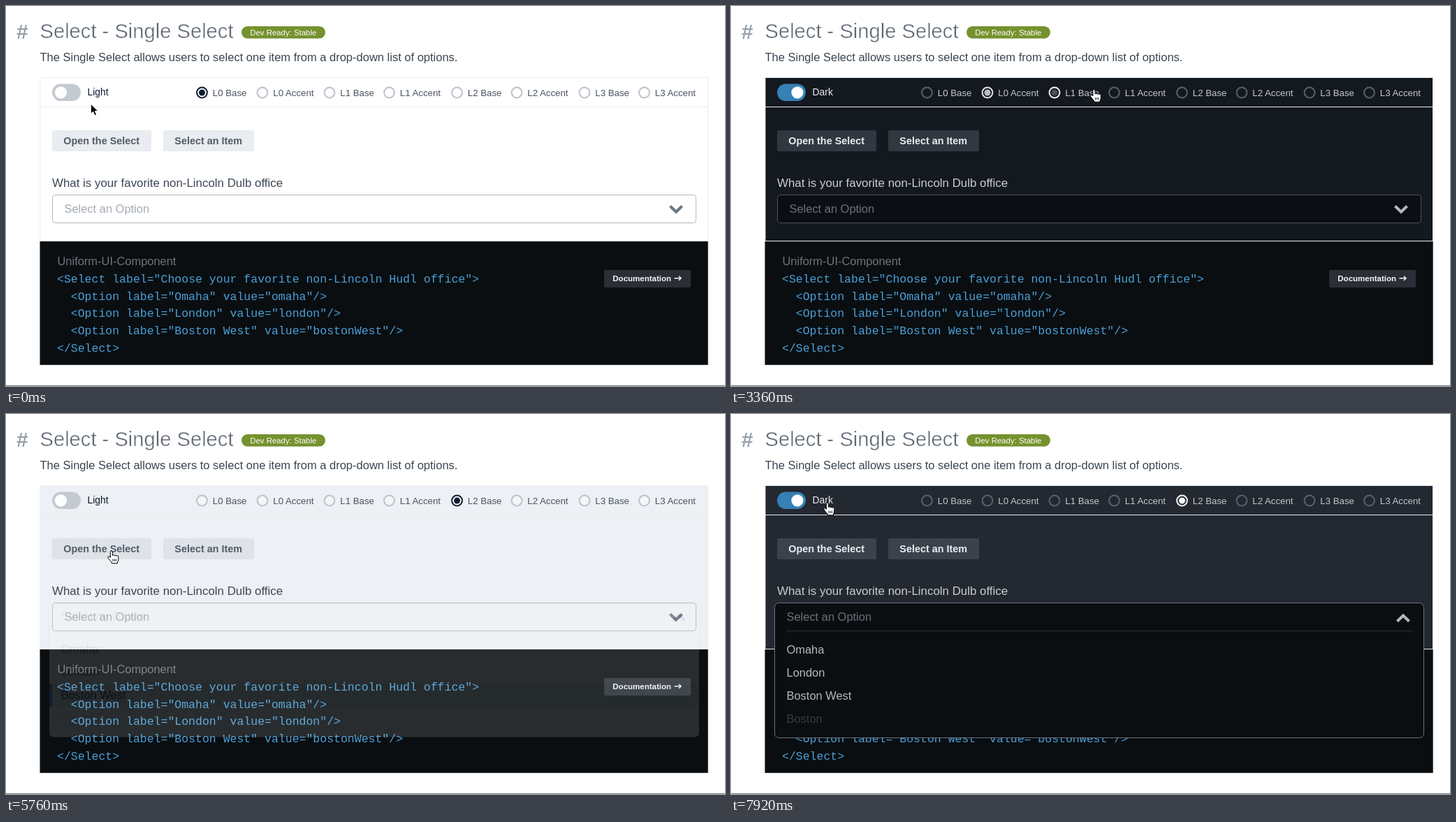
Animation, 1029 px wide and 544 px high, one loop 8 s. Source, as an HTML page:

```html
<!DOCTYPE html>
<html lang="en">
<head>
<meta charset="utf-8">
<title>Single Select</title>
<style>
  html, body { margin: 0; width: 100%; height: 100%; overflow: hidden; background: #fff; }
  svg { display: block; width: 100%; height: 100%; }
  text { font-family: "Liberation Sans", Arial, sans-serif; white-space: pre; }
  .code text { font: 16.5px "Liberation Mono", "Courier New", monospace; fill: #4c9fd6; }
  .body { font-size: 16.45px; }
  .radio { font-size: 13.25px; }
  .btn { font-size: 14.4px; font-weight: 700; }
  .chev { fill: none; stroke-width: 4; }
</style>
</head>
<body>
<svg id="stage" viewBox="0 0 1029 544">
  <defs>
    <filter id="shadow" x="-5%" y="-10%" width="110%" height="125%">
      <feDropShadow dx="0" dy="1" stdDeviation="2" flood-color="#0d1c30" flood-opacity=".3"/>
    </filter>
  </defs>
  <rect width="1029" height="544" fill="#fff"/>
  <text x="15" y="46.5" font-size="30" font-weight="700" fill="#98a2ad">#</text>
  <text x="48.5" y="46" font-size="29.15" fill="#5d6671" stroke="#fff" stroke-width=".5">Select - Single Select</text>
  <rect x="337" y="29" width="120" height="17.5" rx="8.7" fill="#75922e"/>
  <text x="349.3" y="42" font-size="11.4" fill="#fff">Dev Ready: Stable</text>
  <text x="48.5" y="78.5" font-size="16.5" fill="#3a4552">The Single Select allows users to select one item from a drop-down list of options.</text>

  <rect id="panel" x="49" y="102.5" width="955.5" height="234" stroke="#e9ecef"/>
  <path d="M49 144.5H1004" stroke="#e9ecef"/>
  <rect id="track" x="66" y="111.5" width="41" height="24.5" rx="12.2"/>
  <circle id="knob" cy="123.8" r="8.6" fill="#fff"/>
  <text id="mode" x="116.5" y="128.3" font-size="13.9"></text>
  <g id="radios"></g>
  <g id="buttons"></g>
  <text id="label" x="66" y="259" font-size="16.9">What is your favorite non-Lincoln Dulb office</text>
  <rect id="field" x="66.5" y="270.5" width="921" height="40" rx="4"/>
  <text id="hint" class="body" x="83.5" y="296">Select an Option</text>
  <path id="down" class="chev" d="M950.5 286.5l8.5 8.3 8.5-8.3"/>

  <rect x="48.5" y="337" width="956.2" height="176.8" fill="#0a0e11"/>
  <text class="body" x="73.5" y="371" fill="#6e757c">Uniform-UI-Component</text>
  <g class="code">
    <text x="73" y="396">&lt;Select label="Choose your favorite non-Lincoln Hudl office"&gt;</text>
    <text x="92.8" y="420.6">&lt;Option label="Omaha" value="omaha"/&gt;</text>
    <text x="92.8" y="445.4">&lt;Option label="London" value="london"/&gt;</text>
    <text x="92.8" y="470">&lt;Option label="Boston West" value="bostonWest"/&gt;</text>
    <text x="73" y="494.8">&lt;/Select&gt;</text>
  </g>
  <rect x="856" y="378" width="124" height="25" rx="2" fill="#2a2f37"/>
  <text x="868.3" y="394" font-size="11.5" font-weight="700" fill="#f2f4f6">Documentation</text>
  <path d="M956.5 389.8h9.5m-3-3l3 3-3 3" fill="none" stroke="#f2f4f6" stroke-width="1.5"/>

  <g id="menu">
    <rect id="sheet" rx="6"/>
    <g id="active">
      <rect x="62" y="386.5" width="930" height="33" fill="#e8f0f6"/>
      <rect x="62" y="386.5" width="4" height="33" fill="#4a9bd4"/>
    </g>
    <g id="items">
      <text id="menuHint" class="body" x="78.5" y="295">Select an Option</text>
      <path id="rule" d="M78.5 309.5H975"/>
      <path id="up" class="chev" d="M954.5 295.8l8.5-8.3 8.5 8.3"/>
    </g>
  </g>
  <rect y="543" width="1029" height="1" fill="#7a7c80"/>

  <g id="cursor" stroke-linejoin="round">
    <path id="arrow" d="M0 0V14.2L3.3 11.2L5.7 16.6L8.2 15.5L5.9 10.3H10.3Z" fill="#000" stroke="#fff"/>
    <g id="hand" stroke="#000">
      <path fill="#fff" d="M-1.6 1.6a1.6 1.6 0 0 1 3.2 0V6.6a1.5 1.5 0 0 1 2.8.3a1.5 1.5 0 0 1 2.7.7a1.4 1.4 0 0 1 2.7 1V12q0 2-1.3 4V17.8H.2V16.2Q-2 14-4.8 10.2q-.9-1.8.4-2.4t2.8 1.6z"/>
      <path stroke-width=".9" d="M2 11.5v3.4M4.2 11.5v3.4M6.4 11.5v3.4"/>
    </g>
  </g>
</svg>
<script>
const LOOP = 8000, FADE = 200, NAVY = '#0d1c30';
const el = Object.fromEntries([...document.querySelectorAll('[id]')].map(n => [n.id, n]));
const set = (node, attrs) => { for (const k in attrs) node.setAttribute(k, attrs[k]); return node; };
const add = (parent, tag, attrs, text = '') => {
  const node = document.createElementNS('http://www.w3.org/2000/svg', tag);
  node.textContent = text;
  return parent.appendChild(set(node, attrs));
};
const clamp = x => Math.min(1, Math.max(0, x));
const smooth = x => x * x * (3 - 2 * x);
const mix = (a, b, p) => '#' + [1, 3, 5].map(i => {
  const u = parseInt(a.substr(i, 2), 16), v = parseInt(b.substr(i, 2), 16);
  return Math.round(u + (v - u) * p).toString(16).padStart(2, '0');
}).join('');

const radios = [280.5, 367, 463, 548.5, 645.5, 731, 828, 913.5].map((x, i) => {
  const name = `L${i >> 1} ${i % 2 ? 'Accent' : 'Base'}`;
  return {
    x, end: x + (i % 2 ? 75 : 64),
    ring: add(el.radios, 'circle', { cx: x, cy: 124, r: 7.4, 'stroke-width': 2 }),
    dot: add(el.radios, 'circle', { cx: x, cy: 124, r: 4.5 }),
    text: add(el.radios, 'text', { x: x + 15.3, y: 129, class: 'radio' }, name)
  };
});
const buttons = [[66, 142, 'Open the Select'], [225, 130, 'Select an Item']].map(([x, w, name]) => ({
  x, w,
  box: add(el.buttons, 'rect', { x, y: 178, width: w, height: 30, rx: 2 }),
  text: add(el.buttons, 'text', { x: x + 16.3, y: 198, class: 'btn' }, name)
}));
const options = ['Omaha', 'London', 'Boston West', 'Boston'].map((name, i) =>
  add(el.items, 'text', { x: 78.5, y: 342 + 33 * i, class: 'body' }, name));

const light = {
  name: 'Light', track: '#c4cad1', trackFrom: '#b2bac2', knob: 78.5, mode: NAVY,
  ring: '#bcc3cb', on: NAVY, radio: '#4a5461', btnText: '#535d69', btnFrom: '#c3c8cf',
  label: '#3c4754', stroke: '#b0b8c1', hint: '#a3aab3', chev: '#6c7682',
  sheet: '#ffffff', rule: '#e6e9ec', item: '#5f6872', off: '#dfe3e8',
  levels: { 0: ['#ffffff', '#e9ecf0'], 4: ['#edf0f4', '#dfe3e8'] }
};
const dark = {
  name: 'Dark', track: '#3580b5', trackFrom: '#5f93b8', knob: 95, mode: '#e8ebee',
  ring: '#5a616a', on: '#f4f6f8', radio: '#c3c8ce', btnText: '#e8ebee', btnFrom: '#454c55',
  label: '#c9ced3', stroke: '#4c535c', hint: '#6a727b', chev: '#b3b9c0',
  sheet: '#0a0e11', rule: '#2a3037', item: '#b5bbc2', off: '#353b42',
  levels: { 0: ['#0a0e11', '#2a2f38'], 1: ['#10151b', '#2d343d'], 2: ['#141920', '#303841'], 4: ['#232831', '#3a434d'] }
};

// [time, value] switches
const themes = [[-FADE, light], [1540, dark], [4985, light], [7660, dark]];
const picks = [[-FADE, 0], [2600, 1], [3295, 2], [4100, 4]];
// [start, end, x, y, sag]: cursor travel to a point
const moves = [
  [0, 800, 273, 184, 0], [960, 1280, 133, 120, 0], [2080, 2480, 404.5, 119, 0],
  [2800, 3120, 519.5, 119.5, 0], [3540, 3920, 690, 119, 0], [4320, 4720, 133, 120, 4],
  [5140, 5440, 151, 196, 0], [6400, 6720, 277, 197, 0], [7120, 7520, 138, 127, 0]
];

function latest(list, t) {
  let i = list.length - 1;
  while (list[i][0] > t) i--;
  const now = list[i][1];
  return { now, was: i ? list[i - 1][1] : now, p: smooth(clamp((t - list[i][0]) / FADE)) };
}

function cursorAt(t) {
  let x = 121, y = 140;
  for (const [a, b, tx, ty, sag] of moves) {
    if (t < a) break;
    const k = clamp((t - a) / (b - a)), e = 1 - (1 - k) ** 2;
    x += (tx - x) * e;
    y += (ty - y) * e + sag * Math.sin(Math.PI * e);
  }
  return { x, y };
}

function render(t) {
  const { now: th, was, p } = latest(themes, t);
  const pick = latest(picks, t);
  const [bg, btn] = th.levels[pick.now];
  const isDark = th === dark;
  const c = cursorAt(t);
  const inHeader = c.y > 111 && c.y < 137;
  const chev = mix(was.chev, th.chev, p);

  set(el.panel, { fill: bg });
  set(el.track, { fill: was === th ? th.track : mix(th.trackFrom, th.track, p) });
  set(el.knob, { cx: was.knob + (th.knob - was.knob) * p });
  set(el.mode, { fill: th.mode });
  el.mode.textContent = th.name;

  let over = inHeader && c.x > 66 && c.x < 148;
  radios.forEach((r, i) => {
    const hover = inHeader && c.x > r.x - 9 && c.x < r.end;
    over = over || hover;
    const on = i === pick.now ? (pick.was === i ? 1 : pick.p) : i === pick.was ? 1 - pick.p : 0;
    const ring = mix(th.ring, mix(was.on, th.on, p), hover ? 1 : Math.sqrt(on));
    set(r.ring, { stroke: ring, fill: isDark ? 'none' : '#ffffff', 'fill-opacity': on ? 1 : .4 });
    set(r.dot, { fill: th.on, opacity: on });
    set(r.text, { fill: th.radio });
  });
  for (const b of buttons) {
    over = over || (c.y > 178 && c.y < 208 && c.x > b.x && c.x < b.x + b.w + 1);
    set(b.box, { fill: was === th ? btn : mix(th.btnFrom, btn, p) });
    set(b.text, { fill: mix(was.btnText, th.btnText, p) });
  }
  set(el.label, { fill: th.label });
  set(el.field, { fill: isDark ? '#0b0f13' : bg, stroke: th.stroke });
  set(el.hint, { fill: th.hint });
  set(el.down, { stroke: chev });

  set(el.menu, { opacity: smooth(clamp((t - 5700) / 280)) });
  set(el.sheet, isDark
    ? { x: 62.5, y: 270.5, width: 929, height: 193, fill: th.sheet, stroke: '#6a727b', filter: 'none' }
    : { x: 62, y: 270, width: 930, height: 192.5, fill: th.sheet, stroke: 'none', filter: 'url(#shadow)' });
  const active = t < 6860;
  set(el.active, { visibility: active ? 'visible' : 'hidden' });
  set(el.items, { transform: isDark ? 'translate(1 1)' : '' });
  set(el.up, { stroke: chev, transform: isDark ? 'translate(-2 0)' : '' });
  set(el.rule, { stroke: th.rule });
  set(el.menuHint, { fill: th.hint });
  options.forEach((o, i) => set(o, { fill: i === 3 ? th.off : i === 2 && active ? NAVY : th.item }));

  set(el.cursor, { transform: `translate(${c.x} ${c.y})` });
  set(el.hand, { visibility: over ? 'visible' : 'hidden' });
  set(el.arrow, { visibility: over ? 'hidden' : 'visible' });
}

function tick() {
  render(performance.now() % LOOP);
  requestAnimationFrame(tick);
}
tick();
</script>
</body>
</html>
```
